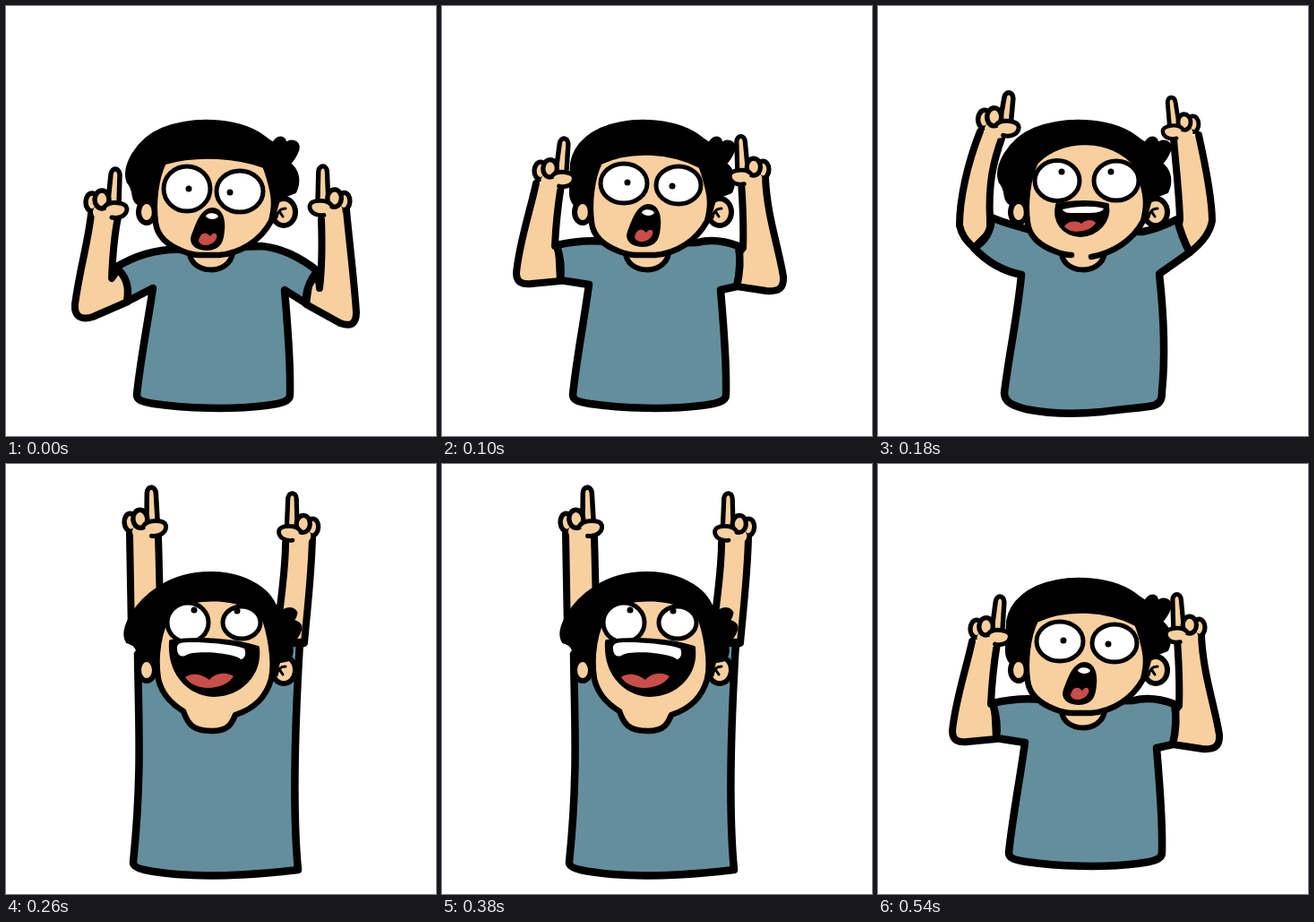
These frames come from a looping animation (480 px wide and 480 px high, 0.62 s). An HTML page with a canvas:

```html
<!DOCTYPE html>
<html>
<head>
<meta charset="utf-8">
<style>
html, body { margin: 0; height: 100%; overflow: hidden; background: #fff; }
canvas { display: block; width: 100vmin; height: 100vmin; }
</style>
</head>
<body>
<canvas id="stage" width="480" height="480"></canvas>
<script>
const c = document.getElementById('stage').getContext('2d');
const SKIN = '#f8d09f', SHIRT = '#648e9c', TONGUE = '#c94d48', WHITE = '#fff', BLACK = '#000';

// Pieces shared by several poses
const torso = ' C158 355 150 395 146 434 C146 440 152 442 165 444 C200 449 250 451 290 446 C308 444 317 441 317 434 C318 395 314 355 311 317 ';
const leftJaw = 'C167 192 164 220 167 242 C169 258 182 268 198 274 C206 277 211 278 216 278 ';
const rightJaw = 'C262 276 284 262 296 240 C300 225 300 215 296 200 C294 192 292 184 289 178 ';
const jaw = 'M176 174 ' + leftJaw + 'L238 278 ' + rightJaw;
const tuft = 'L299 155 C302 146 312 145 311 156 C318 149 327 152 325 160 C322 168 318 173 315 176 C326 184 327 196 322 207 L304 214 L298 236 L172 236 L160 216Z';
const collar = 'M205 276 C207 300 249 301 253 276';
const gasp = {
  hole: 'M230 227 C241 227 243 240 242 250 C241 263 238 271 224 271 C211 271 206 264 209 256 C213 246 218 228 230 227Z',
  teeth: 'M223 235 C224 230 235 230 237 235 C234 239 227 239 223 235Z',
  tongue: 'M215 262 C217 252 224 252 228 257 C232 251 237 254 235 259 C232 268 217 270 215 262Z'
};

// hands: x, y, turn in degrees, size, finger reach; eyes: x, y, rx, ry, pupil x, pupil y
const low = {
  arms: ['M95 232 C92 262 82 295 77 333 C76 347 84 351 97 347 L136 330 L137 310 L126 293 L118 304 C119 280 120 260 125 236',
         'M380 228 C384 270 389 310 391 342 C391 356 384 358 373 354 L335 333 L338 312 L348 297 L350 315 C353 290 353 265 352 238'],
  shirt: 'M200 272 C170 270 145 278 122 292 C134 300 138 314 135 330 L164 315' + torso +
         'L335 332 C334 320 339 305 348 296 C328 280 305 270 285 268Z',
  hands: [[110, 230, 0, 1, 48], [363, 228, -3, .97, 50]],
  hair: 'M148 220 C140 215 146 206 137 196 C131 180 146 150 175 138 C215 123 265 128 290 149 ' + tuft,
  face: jaw + 'C260 167 215 163 176 174Z',
  eyes: [[202, 204, 26, 25, 204, 204], [261, 207, 26, 23, 250, 208]],
  mouth: gasp, mouthY: 0, collar
};
const mid = {
  ...low,
  arms: ['M105 198 C98 230 86 265 83 298 C83 309 90 311 100 310 L132 307 L130 268 L126 268 C127 245 129 225 133 200',
         'M361 192 C363 235 376 270 381 302 C382 316 375 319 362 318 L329 313 L332 275 L336 270 C337 245 336 225 334 196'],
  shirt: 'M200 266 C175 260 150 262 128 267 C132 280 134 292 132 306 L164 311' + torso +
         'L329 313 C332 300 334 285 331 268 C315 262 300 260 285 264Z',
  hands: [[123, 195, 2, .97, 49], [345, 193, 0, .95, 50]],
  hair: 'M148 220 C142 212 145 202 146 190 C142 170 152 150 178 138 C215 123 265 128 290 149 ' + tuft,
  face: jaw + 'C255 161 210 158 176 174Z',
  eyes: [[203, 198, 26, 22, 207, 197], [264, 200, 25, 21, 257, 201]],
  mouthY: -4
};
const high = {
  ...low,
  arms: ['M114 140 C100 175 91 215 91 245 C94 258 100 263 107 270 L125 252 L125 238 C123 200 128 175 139 145',
         'M358 144 C366 180 373 215 373 240 C370 255 360 266 348 275 L335 250 L337 238 C336 205 332 175 330 148'],
  shirt: 'M170 250 C155 246 140 242 127 236 C126 252 120 262 107 270 C122 286 140 296 160 300 C156 345 146 390 141 432 C141 442 150 446 165 450 C195 456 220 456 250 453 C275 449 295 449 308 446 C316 443 317 438 317 430 C321 390 319 345 314 299 L348 275 C341 262 337 250 334 238 C320 245 308 250 295 252Z',
  hands: [[132, 138, 3, 1, 42], [340, 142, 3, .88, 46]],
  face: 'M238 280 ' + rightJaw + 'C262 144 204 144 176 174 ' + leftJaw,
  eyes: [[200, 195, 25, 22.5, 205, 185], [266, 195, 25, 22, 260, 185]],
  mouth: {
    hole: 'M200 222 C220 218 240 218 256 222 C259 240 245 255 226 256 C206 255 196 240 200 222Z',
    teeth: 'M206 227 C225 223 240 223 252 226 C250 231 240 231 228 231 C215 231 208 232 206 227Z',
    tongue: 'M208 246 C212 240 222 239 227 243 C232 238 240 238 243 242 C238 252 215 256 208 246Z'
  }
};
const peak = {
  ...low,
  arms: ['M138 78 L140 190 L172 150 C171 130 171 110 170 82',
         'M342 82 C341 125 336 165 333 200 L310 205 L304 175 C308 145 312 115 312 88'],
  shirt: 'M147 212 C148 290 152 345 142 445 C142 452 160 455 190 458 C240 462 290 457 326 453 C320 390 322 300 328 199 L300 203 L160 215Z',
  hands: [[154, 75, -5, 1, 48], [328, 80, -4, .95, 49]],
  hair: 'M150 215 C146 206 148 202 136 198 C128 185 145 155 172 138 C205 117 255 117 285 140 C298 150 302 162 304 172 C308 162 320 160 323 166 C322 172 318 176 314 178 C320 174 329 178 328 184 C326 192 320 198 316 200 C320 208 318 214 314 218 L304 220 L298 240 L172 240 L160 216Z',
  face: 'M184 162 C170 185 166 215 170 240 C174 258 188 270 198 276 C203 290 208 298 230 298 C248 298 252 290 256 280 C275 274 290 262 296 240 C301 220 294 185 287 168 C265 147 210 144 184 162Z',
  eyes: [[203, 177, 23, 22, 210, 163], [263, 177, 21, 18, 258, 164]],
  mouth: {
    hole: 'M184 198 C215 194 255 196 281 205 C284 235 262 257 232 258 C200 256 182 230 184 198Z',
    teeth: 'M191 206 C190 198 200 199 215 199 C235 200 255 202 266 206 C269 212 266 218 262 218 C255 211 210 207 200 214 C194 216 191 212 191 206Z',
    tongue: 'M200 238 C208 232 220 235 227 241 C234 232 248 232 254 237 C245 252 212 256 200 238Z'
  },
  collar: null
};

function ink(shape, fill, width) {
  const path = typeof shape === 'string' ? new Path2D(shape) : shape;
  if (fill) { c.fillStyle = fill; c.fill(path); }
  if (width) { c.lineWidth = width; c.stroke(path); }
}

function oval(x, y, rx, ry, fill, width) {
  const path = new Path2D();
  path.ellipse(x, y, rx, ry, 0, 0, 7);
  ink(path, fill, width);
}

function hand([x, y, turn, size, reach], side) {
  c.save();
  c.translate(x, y);
  c.scale(side * size, size);
  c.rotate(turn * Math.PI / 180);
  ink(`M4 -12 L7 ${6 - reach} C8 ${-reach - 2} 16 ${-reach - 2} 17 ${6 - reach} L16 -8`, SKIN, 5.5);
  oval(-14, -11, 7, 10, SKIN, 5.5);
  oval(0, 0, 13, 10, SKIN);
  oval(-3, -14, 8, 10, SKIN, 5.5);
  ink('M0 -6 C6 -13 24 -11 25 -4 C25 3 18 8 8 6', SKIN, 5);
  c.restore();
}

function draw(p) {
  c.fillStyle = WHITE;
  c.fillRect(0, 0, 480, 480);
  c.strokeStyle = BLACK;
  c.lineJoin = c.lineCap = 'round';
  p.arms.forEach(d => ink(d, SKIN, 8));
  ink(p.shirt, SHIRT, 8.5);
  if (p.collar) ink(p.collar, SKIN, 6);
  oval(157, 230, 9, 12, SKIN, 6);
  oval(310, 230, 13, 15, SKIN, 6);
  ink(p.hair, BLACK, 5);
  ink(p.face, SKIN, 6.5);
  ink('M302 236 C303 229 307 226 312 226 M305 229 L309 235', null, 3);
  for (const [x, y, rx, ry, px, py] of p.eyes) {
    oval(x, y, rx, ry, WHITE, 5);
    oval(px, py, 3.5, 3.5, BLACK);
  }
  c.save();
  c.translate(0, p.mouthY);
  ink(p.mouth.hole, BLACK, 4);
  ink(p.mouth.teeth, WHITE);
  ink(p.mouth.tongue, TONGUE);
  c.restore();
  hand(p.hands[0], 1);
  hand(p.hands[1], -1);
}

// [end time in ms, pose]
const timeline = [[100, low], [180, mid], [260, high], [460, peak], [540, high], [620, mid]];
const start = performance.now();

function tick() {
  const t = (performance.now() - start) % 620;
  draw(timeline.find(([end]) => t < end)[1]);
  requestAnimationFrame(tick);
}
tick();
</script>
</body>
</html>
```
